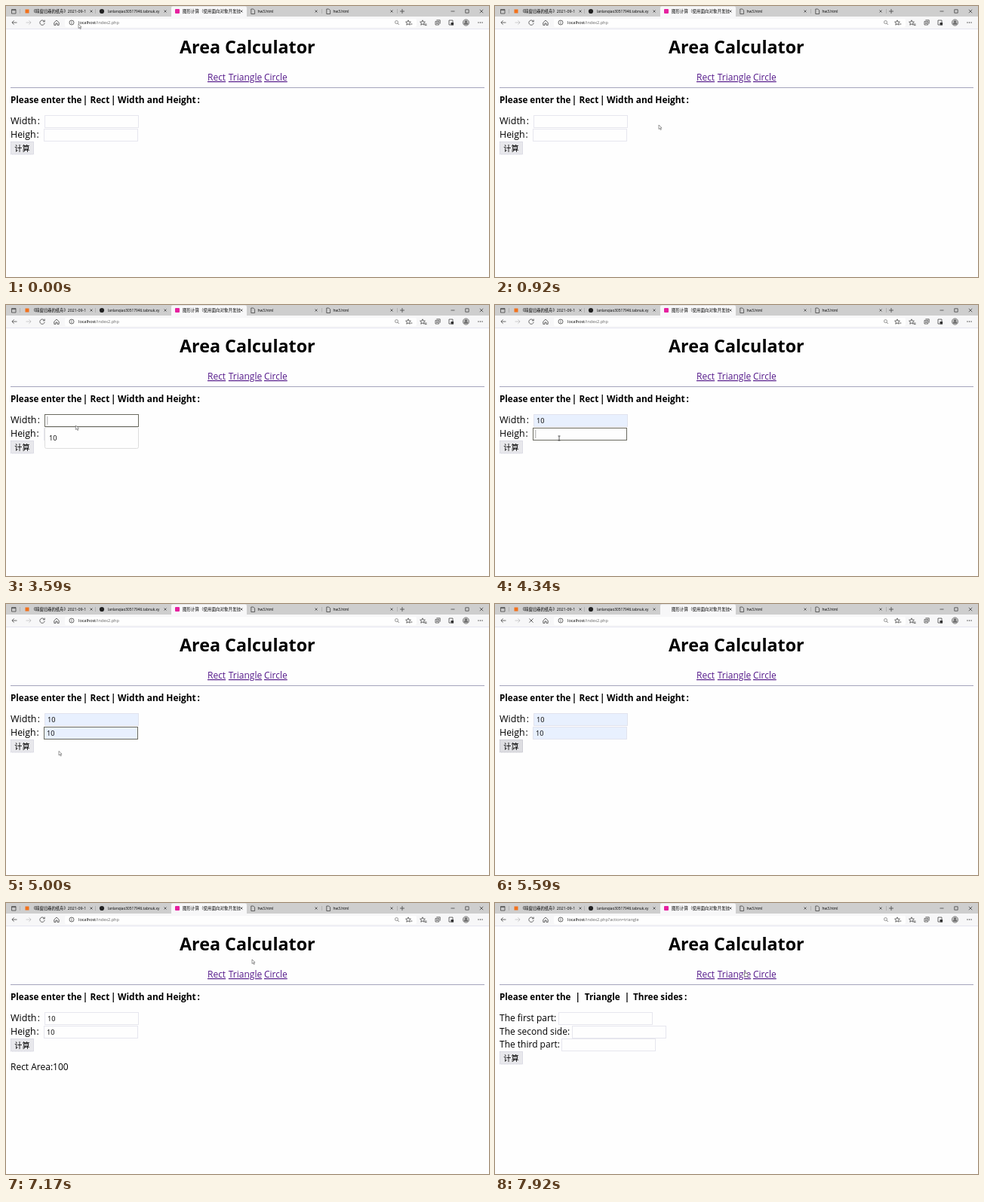
An HTML page that plays this animation: 640 by 360 pixels, repeating every 8 s.

```html
<!DOCTYPE html>
<html lang="zh">
<head>
<meta charset="utf-8">
<title>Area Calculator</title>
<style>
html, body { margin: 0; width: 100%; height: 100%; overflow: hidden; background: #fefefe; }
svg { display: block; width: 640px; height: 360px; }
text { font-family: "Open Sans", "Noto Sans CJK SC", "Noto Sans CJK", sans-serif; white-space: pre; }
.icon { fill: none; stroke: #444; stroke-width: .8; }
.link { fill: #551a8b; text-decoration: underline; }
</style>
</head>
<body>
<svg viewBox="0 0 640 360">
  <g id="chrome"></g>
  <g id="tools"></g>
  <g id="page"></g>
  <g id="cursor"></g>
</svg>
<script>
const LOOP = 8000, STEP = 1000 / 12;
const $ = id => document.getElementById(id);
const BAR = '#cecece', PALE = '#f7f7f8', PAPER = '#fefefe', EDGE = '#cfcfdf';

const text = (x, y, size, str, extra = '') =>
  `<text x="${x}" y="${y}" font-size="${size}" ${extra}>${str}</text>`;
const bold = (x, y, size, str) => text(x, y, size, str, 'font-weight="700"');
const rect = (x, y, w, h, fill, extra = '') =>
  `<rect x="${x}" y="${y}" width="${w}" height="${h}" fill="${fill}" ${extra}/>`;
const icon = (d, extra = '') => `<path class="icon" d="${d}" ${extra}/>`;
const ring = (x, y, r) => `<circle class="icon" cx="${x}" cy="${y}" r="${r}"/>`;
const cross = (x, y, r) => icon(`M${x - r} ${y - r}l${2 * r} ${2 * r}m0 ${-2 * r}l${-2 * r} ${2 * r}`);
const sheet = x => icon(`M${x - 2.2} 4h3l1.8 1.8v4.7h-4.8z`);

function chrome() {
  let s = rect(0, 0, 640, 14, BAR) + rect(0, 14, 640, 16, PALE);
  s += `<path d="M219 14V2.5q0-2 2-2h96q2 0 2 2V14z" fill="${PALE}"/>`;
  s += rect(78, 17, 466, 11, PAPER, 'rx="2"');
  s += rect(0, 30, 640, 1, '#e4e4f0');
  s += icon('M7.5 4.5h5.5v5.5h-5.5zm0 1.2h5.5');
  s += rect(25.5, 4.5, 5, 5, '#f2711c');
  s += '<circle cx="127" cy="7" r="3.1" fill="#222"/>';
  s += text(34, 9, 5.3, '《晴窗旧巷的纸舟》2021-09-1');
  s += text(135, 9, 4.8, 'lanlanqiao30517946.tabnuk.xy');
  s += text(234, 9, 5.5, '图形计算（使用面向对象开发技');
  for (const x of [327, 427]) s += sheet(x) + text(x + 6.5, 9, 4.8, 'hw3.html');
  for (const x of [113, 211, 312, 411, 511]) s += cross(x, 7, 1.5);
  for (const x of [18.5, 118.5, 418.5, 518.5]) s += rect(x, 4, .5, 6, '#999');
  s += icon('M522 7h6m-3-3v6M589.5 7h5M608.8 4.8h4.4v4.4h-4.4z') + cross(630, 7, 2.2);

  s += icon('M14.5 22h-6.5m2.6-2.7l-2.7 2.7 2.7 2.7');
  s += icon('M26.5 22h6.5m-2.6-2.7l2.7 2.7-2.7 2.7', 'opacity=".3"');
  s += icon('M63.8 22l3.2-3 3.2 3v3.4h-2.2v-2.4h-2v2.4h-2.2z');
  s += ring(87, 22, 3) + icon('M87 21.5v2.2m0-3.6v.7');
  s += `<g opacity=".7">${ring(517.5, 21.5, 2)}${icon('M519 23l2 2')}</g>`;
  const star = x => icon(`M${x} 18.8l1 2.2 2.4.2-1.8 1.6.6 2.4-2.2-1.3-2.2 1.3.6-2.4-1.8-1.6 2.4-.2z`);
  s += star(533) + star(552) + icon('M554.5 24h3m-2.4 1.6h2.4M536 24h2.4');
  s += icon('M569 20.4h4.6v4.6h-4.6zm1.4-1.6h4.8v4.8M571.3 21.5v2.4m-1.2-1.2h2.4');
  s += icon('M587 19h5v3m-5-3v6h2.5') + rect(589.5, 22, 3.6, 3.6, '#333');
  s += '<circle cx="609.5" cy="22" r="4.2" fill="#bbb" stroke="#777" stroke-width=".7"/>' +
    '<circle cx="609.5" cy="20.8" r="1.5" fill="#666"/><path d="M606.5 24.6a3 2.4 0 016 0z" fill="#666"/>';
  for (const x of [626, 628.5, 631]) s += `<circle cx="${x}" cy="22" r=".65" fill="#333"/>`;
  return s;
}

function tools({ loading, tri }) {
  let s = loading
    ? cross(48, 22, 2.6)
    : rect(224, 4, 6, 6, '#e6219f', 'rx="1"') + icon('M50.8 20.5a3.2 3.2 0 10.4 2.2M51.2 18.6v2.2h-2.2');
  return s + text(96, 24, 5.5,
    `localhost<tspan fill="#666">/index2.php${tri ? '?action=triangle' : ''}</tspan>`);
}

function field(x, y, f = {}) {
  let s = rect(x + .5, y + .5, 124, 16, f.auto ? '#e8f0fe' : PAPER, f.focus
    ? 'stroke="#6a6a60"'
    : `stroke="${EDGE}" stroke-dasharray="1 1"`);
  if (f.value) s += text(x + 4, y + 11.6, 9.2, f.value);
  if (f.focus && !f.value) s += rect(x + 3.5, y + 3, .7, 11, '#888');
  return s;
}

const menu = (x, y) =>
  rect(x + .5, y + .5, 124, 28, PAPER, 'stroke="#ddd" rx="2"') + text(x + 6, y + 17.5, 9.2, '10');

const button = (y, down) =>
  rect(6.5, y + .5, 30, 16.5, down ? '#dedee2' : '#e8e8ec', `stroke="${down ? '#b0b0bc' : '#c4c4d4'}" stroke-dasharray="1 1"`) +
  text(11.3, y + 12.6, 10.2, '计算');

function page({ tri, width, height, menu1, menu2, down, done }) {
  let s = bold(230, 62.6, 23.3, 'Area Calculator');
  s += text(267, 99, 12, 'Rect', 'class="link"') + text(294.8, 99, 12, 'Triangle', 'class="link"') +
    text(342, 99, 12, 'Circle', 'class="link"');
  s += rect(6, 108, 628, 1, '#a4a4bc');
  s += bold(6, 129, 11.6, 'Please enter the');
  if (tri) {
    s += bold(106.5, 129, 11.7, '|') + bold(118.8, 129, 11.7, 'Triangle') + bold(171.8, 129, 11.7, '|') +
      bold(183, 129, 11.7, 'Three sides') + bold(251, 129, 11.7, ':');
    [['first part', 84], ['second side', 102], ['third part', 88]].forEach(([name, x], i) => {
      s += text(6, 157 + i * 17.5, 12, `The ${name}:`) + field(x, 145 + Math.round(i * 17.5));
    });
    return s + button(197, false);
  }
  s += bold(101.8, 129, 11.7, '|') + bold(111.5, 129, 11.7, 'Rect') + bold(139, 129, 11.7, '|') +
    bold(148, 129, 11.9, 'Width and Height') + bold(253.6, 129, 11.7, ':');
  s += text(6, 157, 12.5, 'Width') + text(41.8, 157, 12, ':') + field(51, 145, width);
  s += text(6, 175, 12.4, 'Heigh') + text(40.4, 175, 12, ':') + field(50, 163, height);
  s += button(180, down);
  if (done) s += text(6, 222, 12, 'Rect Area:100');
  if (menu1) s += menu(51, 162);
  if (menu2) s += menu(50, 181);
  return s;
}

// Pointer path: time, x, y
const path = [
  [0, 96, 24], [250, 104, 60], [580, 150, 150], [920, 217, 158], [1080, 215, 160],
  [1670, 70, 163], [1830, 60, 150], [2500, 17, 70], [2590, 10, 65], [2750, 12, 68],
  [3250, 95, 154], [3500, 95, 154], [3750, 85, 177], [4500, 85, 177], [4750, 78, 197],
  [4920, 78, 197], [5250, 24, 186], [6000, 24, 186], [6670, 50, 126], [7170, 326, 75],
  [7420, 331, 91], [8000, 331, 91]
];

function pointer(t) {
  const i = Math.max(1, path.findIndex(p => p[0] > t));
  const [a, b] = [path[i - 1], path[i]];
  let k = (t - a[0]) / (b[0] - a[0]);
  k = k * k * (3 - 2 * k);
  return [a[1] + (b[1] - a[1]) * k, a[2] + (b[2] - a[2]) * k];
}

const shapes = {
  arrow: '<path d="M0 0v5.6l1.4-1.2 1 2.2.9-.4-1-2.2h1.8z" fill="#fff" stroke="#555" stroke-width=".6"/>',
  beam: '<path d="M-1.5-3h3M0-3v6M-1.5 3h3" fill="none" stroke="#333" stroke-width=".8"/>',
  hand: '<path d="M-.2 0q.7-.7 1.3 0v2.4l2.6.7q.7.3.5 1.1l-.6 2.4h-3.2l-2-2.6q.2-.8 1.4 0z" fill="#fff" stroke="#444" stroke-width=".6"/>'
};

function stateAt(t) {
  const within = (a, b) => t >= a && t < b;
  return {
    tri: t >= 7740,
    loading: within(5480, 5700) || within(7570, 7740),
    width: { focus: within(3320, 4160), value: t >= 3900 ? '10' : '', auto: within(3900, 5700) },
    height: { focus: within(4160, 5400), value: t >= 4900 ? '10' : '', auto: within(4900, 5700) },
    menu1: within(3480, 3900),
    menu2: within(4480, 4900),
    down: within(5240, 5700),
    done: t >= 5700
  };
}

let last = '';
function draw(ms) {
  const t = Math.floor((ms % LOOP) / STEP) * STEP;
  const s = stateAt(t), key = JSON.stringify(s);
  if (key !== last) {
    $('tools').innerHTML = tools(s);
    $('page').innerHTML = page(s);
    last = key;
  }
  const [x, y] = pointer(t);
  const inField = x > 51 && x < 176 && y > 145 && y < 180 && !s.menu1 && !s.menu2;
  const onLink = y > 86 && y < 103 && x > 267 && x < 373;
  $('cursor').innerHTML = shapes[inField ? 'beam' : onLink ? 'hand' : 'arrow'];
  $('cursor').setAttribute('transform', `translate(${x.toFixed(1)} ${y.toFixed(1)})`);
}

$('chrome').innerHTML = chrome();
const start = performance.now();
function tick() {
  draw(performance.now() - start);
  requestAnimationFrame(tick);
}
tick();
</script>
</body>
</html>
```
